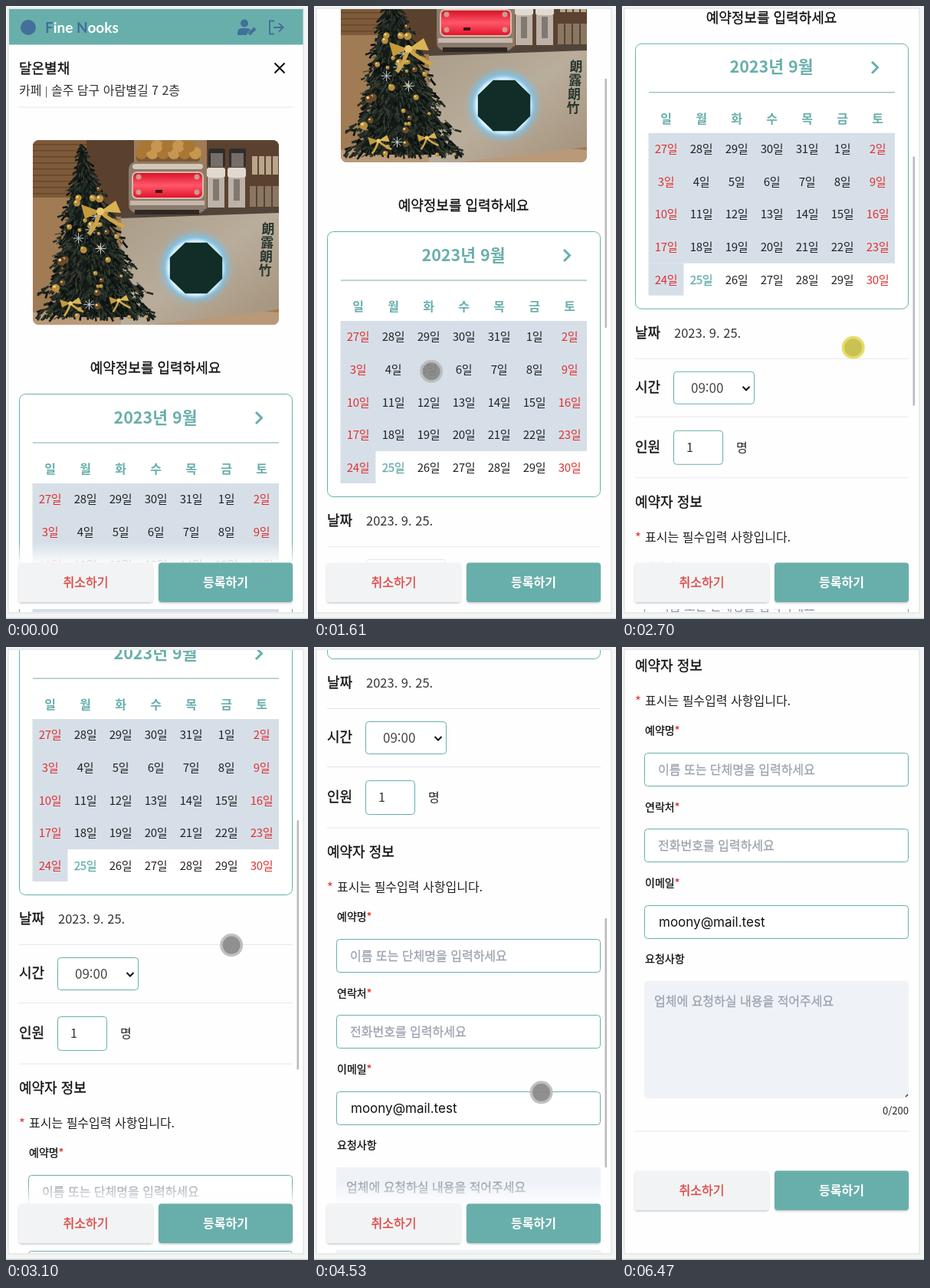
An HTML page for the animation above (7060 ms loop, 394 px wide and 800 px high).

```html
<!DOCTYPE html>
<html lang="ko">
<head>
<meta charset="utf-8">
<title>예약</title>
<style>
  html, body { margin: 0; width: 100%; height: 100%; overflow: hidden; background: #f4f5f5; }
  svg { display: block; font-family: "Noto Sans CJK KR", "Noto Sans CJK JP", "Noto Sans CJK", sans-serif; }
  text { white-space: pre; fill: currentColor; }
  .medium { stroke: currentColor; stroke-width: .3; }
</style>
</head>
<body>
<svg id="stage" width="394" height="800" viewBox="0 0 394 800"></svg>
<script>
const LOOP = 7060, TEAL = '#68afab', BLUE = '#42709a', RED = '#e03131';

let seed = 7;
const rnd = () => (seed = (seed * 16807) % 2147483647) / 2147483647;
const between = (a, b) => a + (b - a) * rnd();
const range = (n, make) => Array.from({ length: n }, (_, i) => make(i));
const repeat = (n, make) => range(n, make).join('');

const rect = (x, y, w, h, fill, more = '') =>
  `<rect x="${x}" y="${y}" width="${w}" height="${h}" fill="${fill}" ${more}/>`;
const circle = (x, y, r, fill, more = '') =>
  `<circle cx="${x}" cy="${y}" r="${r}" fill="${fill}" ${more}/>`;
const path = (d, stroke, width) => `<path d="${d}" fill="none" stroke="${stroke}" stroke-width="${width}"/>`;
const poly = (points, fill) => `<polygon points="${points}" fill="${fill}"/>`;
// y is the middle of the line of text
const text = (x, y, size, str, color = '#111', more = '') =>
  `<text x="${x}" y="${y + size * .36}" font-size="${size}" color="${color}" ${more}>${str}</text>`;
const MID = 'text-anchor="middle"', MEDIUM = 'class="medium"', BOLD = 'font-weight="700"';
const tint = (color, str) => `<tspan color="${color}">${str}</tspan>`;
const title = (y, str) => text(17, y, 18, str, '#111', MEDIUM);
const divider = y => rect(17, y, 357, 1, '#e5e7eb');
const box = (x, y, w, h, r = 4) => rect(x + .5, y + .5, w - 1, h - 1, '#fff', `rx="${r}" stroke="${TEAL}"`);

function header() {
  return rect(4, 4, 384, 46.5, TEAL) + circle(29, 28, 10, BLUE) +
    text(51, 28, 19, tint(BLUE, 'F') + 'ine ' + tint(BLUE, 'N') + 'ooks', '#fff', BOLD + ' font-family="Lato, sans-serif"') +
    circle(311, 22.5, 5, BLUE) + `<path d="M302 38v-3q0-6 6-6h6q3 0 5 2l-4 4-1 3z" fill="${BLUE}"/>` +
    path('M317 37L325 29', BLUE, 4.5) +
    path('M350 19.5h-6v17h6M349 28h12M356 22.5l5.5 5.5-5.5 5.5', BLUE, 2) +
    title(82, '달온별채') + text(17, 110, 16, '카페 <tspan font-size="13">|</tspan> 솔주 담구 아람별길 7 2층', '#333') +
    path('M350.5 74.5l13 13m0-13l-13 13', '#111', 2) + divider(131.5);
}

const bow = (x, y, s) => `<g transform="translate(${x} ${y}) scale(${s})">` +
  poly('0,0 -25,-9 -20,10', '#c49a3c') + poly('0,0 20,-14 27,2', '#d9b455') +
  path('M0 0Q-6 20-15 30M0 0Q12 12 31 20', '#cda548', 5) + circle(0, 0, 5, '#e6c873') + '</g>';

function tree() {
  // a point on tier-shaped branches: k runs down the tree, side from -1 to 1
  const at = (k, side) => [98 + 21 * k + side * 80 * k * (.72 + .28 * (k * 7 % 1)), 180 + 226 * k];
  const tone = ['#0b0f0e', '#151c18', '#232c25', '#3a4234'];
  const needles = color => path(repeat(420, () => {
    const side = between(-1, 1), [x, y] = at(Math.sqrt(rnd()), side);
    return `M${x.toFixed(1)} ${y.toFixed(1)}l${(side * 6 + between(-3, 3)).toFixed(1)} ${between(1, 8).toFixed(1)}`;
  }), color, color === tone[3] ? 1.2 : 2.6);
  const ball = () => {
    const [x, y] = at(Math.sqrt(between(.03, 1)), between(-.9, .9)), r = between(2, 5.5);
    return circle(x, y, r, rnd() < .65 ? '#b98f3b' : '#6d4a2a') + circle(x - r / 3, y - r / 3, r / 3, '#f1d88c');
  };
  const flake = () => {
    const [x, y] = at(between(.3, .95), between(-.4, .6));
    return path(`M${x - 7} ${y}h14m-7-7v14m-5-12l10 10m0-10l-10 10`, '#c9cdc9', 1);
  };
  const core = range(60, i => at((i < 30 ? i : 59 - i) / 29, i < 30 ? -.85 : .85)).join(' ');
  return poly(core, '#131a17') + tone.map(needles).join('') + repeat(36, ball) + repeat(5, flake) +
    bow(123, 268, 1) + bow(84, 388, .55) + bow(147, 384, .5);
}

function photo() {
  const grinder = x => rect(x, 186, 22, 24, '#302d2c', 'rx="3"') + rect(x + 3, 192, 16, 18, '#756d68') +
    rect(x - 2, 211, 24, 13, '#e1d9cf', 'rx="3"') + rect(x - 1, 224, 22, 39, '#bcb2a7') + rect(x + 6, 226, 8, 28, '#817970');
  const octagon = range(8, i => {
    const a = (i + .5) * Math.PI / 4;
    return [248 + 37 * Math.cos(a), 342 + 36 * Math.sin(a)];
  }).join(' ');
  const room = rect(35, 175, 321, 241, '#a07b54') + rect(35, 175, 70, 75, '#7d5a3a') +
    repeat(9, i => rect(35, 180 + i * 8, 70, 1.5, '#674629')) +
    rect(105, 175, 62, 100, '#59412e') + rect(262, 175, 94, 92, '#5b4230') +
    repeat(4, i => rect(321 + i * 9, 196, 7, 24, '#b8a58b') + rect(318 + i * 10, 235, 8, 27, '#897761')) +
    poly('35,400 190,385 356,400 356,416 35,416', '#b99978') +
    poly('150,271 356,265 356,396 190,416 150,416', 'url(#counter)') + poly('150,268 356,262 356,270 150,277', '#51453b');
  const oven = rect(170, 188, 83, 16, '#7f5930', 'rx="5"') +
    repeat(11, i => circle(177 + i % 6 * 14 + (i > 5) * 6, i < 6 ? 192 : 183, 8, i % 2 ? '#c59750' : '#a97634')) +
    rect(160, 203, 101, 67, '#8b7b6e', 'rx="10"') + rect(165, 206, 92, 7, '#d5c7b6', 'rx="4"') +
    rect(165, 217, 92, 34, 'url(#oven)', 'rx="6" stroke="#d5bda9" stroke-width="2"') +
    repeat(4, i => circle(173 + i % 2 * 76, 223 + (i > 1) * 20, 3.5, '#cf9a8e')) +
    rect(195, 240, 9, 4, '#421015') + rect(162, 254, 97, 6, '#c6b8ab') + rect(168, 266, 84, 6, '#2e2722');
  const sign = [...'朗露朗竹'].map((c, i) => text(342 - i * 1.3, 291 + i * 18, 17, c, '#26362f', MID + ' ' + BOLD)).join('');
  return `<g clip-path="url(#photo)">${room}${oven}${grinder(264)}${grinder(291)}
    ${circle(247, 341, 43, '#75c4f2', 'filter="url(#blur)"')}${circle(247, 342, 37, '#f4fcff', 'filter="url(#soft)"')}
    ${poly(octagon, '#102d28')}${sign}${tree()}</g>` +
    text(195, 473, 18, '예약정보를 입력하세요', '#111', MID + ' ' + MEDIUM);
}

function calendar() {
  const column = i => 57.5 + 46 * (i % 7);
  const day = i => {
    const n = i < 5 ? 27 + i : i - 4, today = i > 5 && n === 25;
    return text(column(i), 644 + 42.6 * Math.floor(i / 7), 15, n + '일', today ? TEAL : i % 7 % 6 ? '#222' : RED,
      `${MID} letter-spacing="-.4" ${today ? MEDIUM : 'font-weight="300"'}`);
  };
  return box(17, 506, 357, 347, 8) + text(195, 537, 21.5, '2023년 9월', TEAL, MID + ' ' + BOLD) +
    path('M326 530l7.5 7.5-7.5 7.5', TEAL, 3) + rect(35, 569.5, 321, 1, '#79aaa8') +
    rect(34.5, 623, 321.5, 170, '#d6dfe8') + rect(34.5, 793, 46, 42, '#d6dfe8') +
    [...'일월화수목금토'].map((d, i) => text(column(i), 604, 16, d, TEAL, MID + ' ' + BOLD)).join('') + repeat(35, day);
}

function form() {
  const label = (y, str) => text(30, y, 14, str, '#111', MEDIUM);
  const hint = (x, y, str) => text(x, y, 16, str, '#9ca3af', MEDIUM);
  const field = (i, name, content) =>
    label(1189 + 99.5 * i, name + tint(RED, '*')) + box(29, Math.round(1218 + 99.4 * i), 345, 44) + content(1240 + 99.5 * i);
  return title(884, '날짜') + text(68, 884, 16.5, '2023. 9. 25.', '#333', 'font-weight="300"') +
    title(955, '시간') + box(67, 934, 106, 43) + text(90, 956, 17, '09:00', '#444', 'font-weight="300"') +
    path('M157.5 954l4.5 4.5 4.5-4.5', '#111', 2) +
    title(1033, '인원') + box(67, 1011, 65, 45) + text(84, 1033, 16, '1', '#333') + text(149, 1033, 16, '명', '#222') +
    [917, 993, 1072.5, 1711.5].map(divider).join('') + title(1105, '예약자 정보') +
    text(17, 1151, 17, '*', RED) + text(30, 1150, 16, '표시는 필수입력 사항입니다.', '#222') +
    field(0, '예약명', y => hint(47, y, '이름 또는 단체명을 입력하세요')) +
    field(1, '연락처', y => hint(47, y, '전화번호를 입력하세요')) +
    field(2, '이메일', y => text(48, y, 17, 'moony@mail.test', '#111', 'font-family="Inter, sans-serif"')) +
    label(1487, '요청사항') + rect(29, 1516, 345, 153, '#eff3f8', 'rx="4"') +
    hint(42, 1542, '업체에 요청하실 내용을 적어주세요') + path('M370 1667l3-3', '#333', 1.3) +
    text(374, 1685, 13, '0/200', '#222', 'text-anchor="end"');
}

function buttons() {
  const button = (x, fill, str, color, more) =>
    rect(x, .5, 175, 51.5, fill, 'rx="4" filter="url(#shadow)"') + text(x + 87.5, 26, 16, str, color, MID + ' ' + more);
  return rect(16, -26, 359, 26.5, 'url(#fade)') + rect(16, 0, 359, 61, '#fefefe') +
    button(16.5, '#f1f3f5', '취소하기', '#dc4640', MEDIUM) + button(199, TEAL, '등록하기', '#fff', BOLD);
}

const gradient = (id, x2, ...stops) => `<linearGradient id="${id}" x2="${x2}" y2="1">` +
  stops.map((c, i) => `<stop offset="${i / (stops.length - 1)}" stop-color="${c}"/>`).join('') + '</linearGradient>';
const blur = (id, d) =>
  `<filter id="${id}" x="-50%" y="-50%" width="200%" height="200%"><feGaussianBlur stdDeviation="${d}"/></filter>`;

document.getElementById('stage').innerHTML = `<defs>
  <clipPath id="screen">${rect(4, 4, 383.5, 787, '#000')}</clipPath>
  <clipPath id="photo">${rect(35, 175, 321, 241, '#000', 'rx="8"')}</clipPath>
  ${gradient('fade', 0, '#fefefe00', '#fefefee8')}
  ${gradient('counter', 1, '#aa9c88', '#b9ad9b', '#a3917a')}
  ${gradient('oven', 0, '#d60e27', '#ff5868', '#df1029')}
  ${blur('blur', 5)}${blur('soft', 2)}
  <filter id="shadow" x="-5%" y="-10%" width="110%" height="130%"><feDropShadow dx="0" dy="1.5" stdDeviation="1.2" flood-opacity=".2"/></filter>
  </defs>
  ${rect(3, 3, 385, 789, '#fefefe', 'stroke="#d9dcdc"')}${rect(0, 798.5, 394, 1.5, '#cfd2d2')}
  <g clip-path="url(#screen)">
    <g id="page">${header()}${photo()}${calendar()}${form()}</g>
    <g id="bar">${buttons()}</g>
    ${rect(379.5, 0, 2.5, 325, '#b9bbbb', 'id="thumb"')}
  </g>
  <g id="dot">${circle(0, 0, 15, '#000')}${circle(0, 0, 11.5, '#000')}</g>`;

// Each touch goes from one point to another; the page glides to `scroll` with it.
const touch = (press, lift, from, to = from, scroll = 0) => ({ press, lift, from, to, scroll });
const TOUCHES = [
  touch(-80, -80, [369, 709]),
  touch(420, 420, [324, 467]),
  touch(740, 1350, [324, 467], [276, 229], 212),
  touch(1880, 1960, [91, 602]),
  touch(2380, 2950, [328, 643], [294, 388], 317),
  touch(3560, 4130, [320, 612], [294, 385], 308),
  touch(4800, 5740, [297, 613], [352, 351], 243),
  touch(6440, 6440, [352, 740]),
];
const REST = 150, SETTLE = 140, LINGER = 660;

const clamp = u => Math.min(1, Math.max(0, u));
const ease = (t, a, b) => a < b ? Math.sin(clamp((t - a) / (b - a)) * Math.PI / 2) : +(t >= a);
const mix = (p, q, u) => p.map((v, i) => v + (q[i] - v) * u);

function finger(t) {
  const i = TOUCHES.findLastIndex(k => t >= k.press), now = TOUCHES[i], next = TOUCHES[i + 1];
  if (t < now.lift || !next) return mix(now.from, now.to, ease(t, now.press, now.lift));
  return mix(now.to, next.from, ease(t, now.lift + REST, next.press - SETTLE));
}

const el = id => document.getElementById(id);
const move = (id, x, y) => el(id).setAttribute('transform', `translate(${x.toFixed(2)} ${y.toFixed(2)})`);
const alpha = (id, a) => el(id).setAttribute('opacity', a);

function draw() {
  const t = performance.now() % LOOP;
  const scroll = TOUCHES.reduce((sum, k) => sum + k.scroll * ease(t, k.press, k.lift), 0);
  move('page', 0, -scroll);
  move('bar', 0, Math.min(726, 1763 - scroll));
  move('thumb', 0, 7 + .4146 * scroll);
  alpha('thumb', Math.max(...TOUCHES.map(k => k.scroll && t >= k.press ? clamp(1 - (t - k.lift - LINGER) / 60) : 0)));
  move('dot', ...finger(t));
  alpha('dot', t < 70 ? 0 : .93 * clamp((6470 - t) / 140));
  const down = TOUCHES.some(k => t >= k.press && t < k.lift);
  const [ring, core] = el('dot').children;
  ring.setAttribute('fill', down ? '#e2db5f' : '#bcbcbc');
  core.setAttribute('fill', down ? '#c5be45' : '#888');
  requestAnimationFrame(draw);
}
draw();
</script>
</body>
</html>
```
